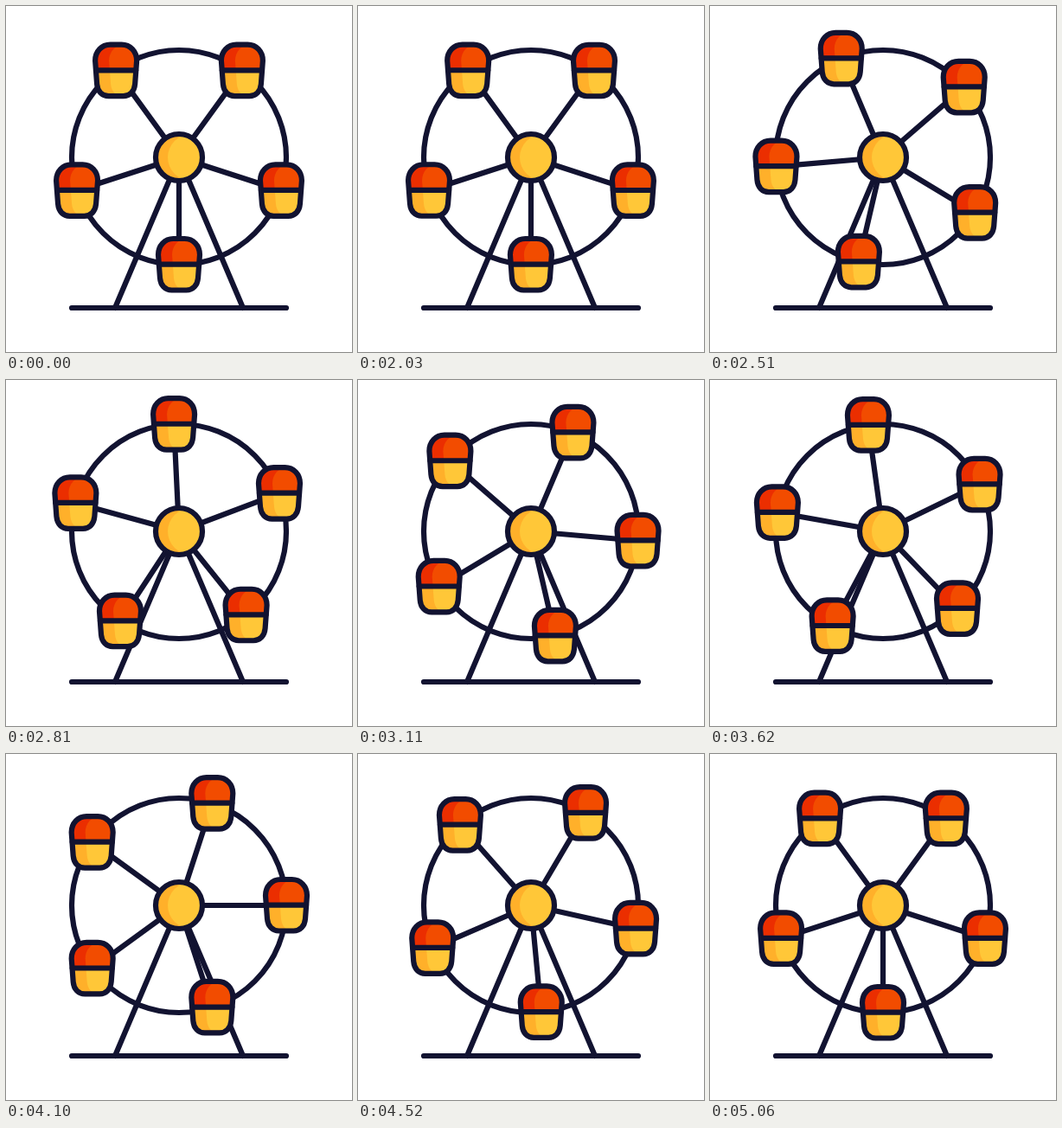
Recreate the animation shown at these times as an HTML page. Size 400x400 px, loop 5.09 s.

```html
<!DOCTYPE html>
<html lang="en">
<head>
<meta charset="utf-8">
<title>Ferris wheel</title>
<style>
  html, body { margin: 0; width: 100%; height: 100%; overflow: hidden; background: #fff; }
  svg { display: block; width: 100vw; height: 100vh; }
  .line { fill: none; stroke: #121331; stroke-width: 6.2; stroke-linecap: round; stroke-linejoin: round; }
</style>
</head>
<body>
<svg viewBox="0 0 400 400">
  <defs>
    <path id="shell" d="M-24-11.5C-24-22-16.5-30-6.5-30H6.5C16.5-30 24-22 24-11.5L22 15.5C21.3 24 16 29.5 8.5 29.5H-8.5C-16 29.5-21.3 24-22 15.5Z"/>
    <clipPath id="shellClip"><use href="#shell"/></clipPath>
    <clipPath id="topClip"><path d="M-40-40H40V-.4H-40Z"/></clipPath>
    <clipPath id="hubClip"><circle r="27"/></clipPath>
    <g id="cabin">
      <g clip-path="url(#shellClip)">
        <use href="#shell" fill="#ffb02a"/>
        <use href="#shell" x="16" fill="#ffc738"/>
        <g clip-path="url(#topClip)">
          <use href="#shell" fill="#eb2e00"/>
          <use href="#shell" x="16" fill="#f24c00"/>
        </g>
      </g>
      <use href="#shell" class="line"/>
      <path class="line" d="M-23-.4H23"/>
    </g>
  </defs>
  <path class="line" d="M76 349H324M126 349L200 175L274 349"/>
  <g transform="translate(200 175)">
    <circle class="line" r="124"/>
    <path class="line" id="spokes"/>
    <g id="cabins"></g>
    <g clip-path="url(#hubClip)">
      <circle r="27" fill="#ffb02a"/>
      <circle r="27" cx="14" fill="#ffc738"/>
    </g>
    <circle class="line" r="27"/>
  </g>
</svg>
<script>
  const LOOP = 5090, START = 2000, STEP = 30;
  const COUNT = 5, RADIUS = 124, TURN = 144;
  const spokes = document.getElementById('spokes');
  const holder = document.getElementById('cabins');

  const cabins = Array.from({ length: COUNT }, () => {
    const cabin = document.createElementNS('http://www.w3.org/2000/svg', 'use');
    cabin.setAttribute('href', '#cabin');
    return holder.appendChild(cabin);
  });

  // Same curve as cubic-bezier(.333, 0, .42, 1)
  function ease(x) {
    let low = 0, high = 1, s = 0.5;
    for (let i = 0; i < 30; i++) {
      s = (low + high) / 2;
      const at = 3 * s * (1 - s) ** 2 * 0.333 + 3 * s * s * (1 - s) * 0.42 + s ** 3;
      if (at < x) low = s; else high = s;
    }
    return s * s * (3 - 2 * s);
  }

  function draw(time) {
    const tick = Math.floor(Math.max(0, time - START) / STEP) * STEP;
    const angle = tick ? TURN * ease(tick / (LOOP - START)) : 0;
    let d = '';
    cabins.forEach((cabin, i) => {
      const a = (90 + angle + i * 360 / COUNT) * Math.PI / 180;
      const x = (RADIUS * Math.cos(a)).toFixed(3);
      const y = (RADIUS * Math.sin(a)).toFixed(3);
      cabin.setAttribute('transform', `translate(${x} ${y})`);
      d += `M0 0L${x} ${y}`;
    });
    spokes.setAttribute('d', d);
  }

  const origin = performance.now();
  function frame() {
    draw((performance.now() - origin) % LOOP);
    requestAnimationFrame(frame);
  }
  draw(0);
  requestAnimationFrame(frame);
</script>
</body>
</html>
```
